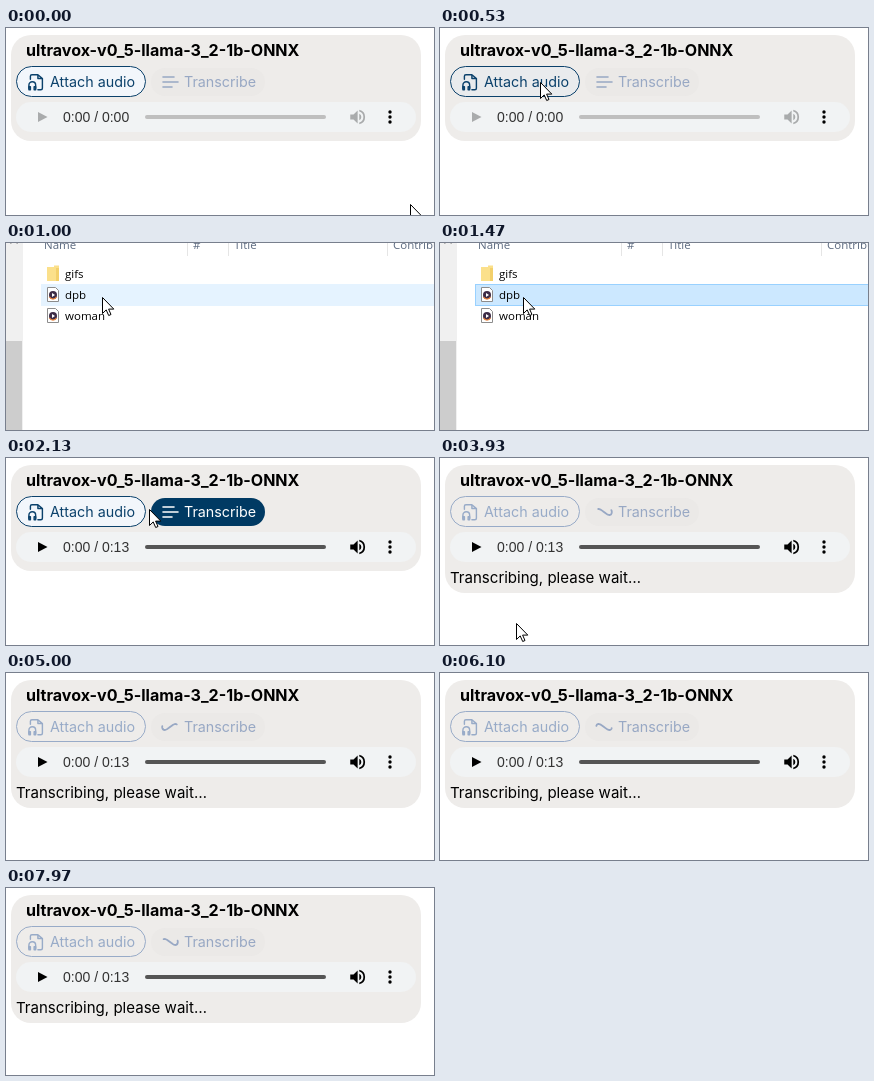
Recreate the animation shown at these times as an HTML page. Size 428 by 187 pixels, loop 8 s.

```html
<!DOCTYPE html>
<html lang="en">
<head>
<meta charset="utf-8">
<style>
  html, body { margin: 0; width: 100%; height: 100%; overflow: hidden; background: #fff; }
  svg { display: block; width: 428px; height: 187px; }
  .ui { font-family: Inter, sans-serif; font-size: 14.3px; }
  .files { font: 11.5px "Open Sans", sans-serif; }
  .line { fill: none; stroke: currentColor; stroke-linecap: round; stroke-linejoin: round; }
  .label { fill: currentColor; }
</style>
</head>
<body>
<svg viewBox="0 0 428 187">
  <g id="page" class="ui">
    <rect id="card" x="5" y="7" width="410" rx="20" fill="#eeecea"/>
    <text x="20" y="28" font-size="16.06" font-weight="700">ultravox-v0_5-llama-3_2-1b-ONNX</text>

    <g id="attach">
      <rect id="attachBox" x="10.5" y="38.5" width="129" height="30" rx="15" stroke="currentColor"/>
      <g class="line" stroke-width="1.9" transform="translate(21.4 45.2) scale(.75)">
        <path d="M4 8V4a2 2 0 0 1 2-2h8l6 5v13a2 2 0 0 1-2 2h-4M14 2v5h6M2 20v-4a4.500 4.500 0 0 1 9 0v4"/>
        <path d="M2 18h2v4H2zM9 18h2v4H9z"/>
      </g>
      <text class="label" x="44" y="59">Attach audio</text>
    </g>

    <g id="transcribe">
      <rect id="transcribeBox" x="145" y="40" width="114" height="28" rx="14"/>
      <path id="lines" class="line" stroke-width="1.6" d="M157 49h11M157 54h15M157 59h9"/>
      <path id="spinner" class="line" stroke-width="1.8"/>
      <text class="label" x="178" y="59">Transcribe</text>
    </g>

    <rect x="10" y="74" width="400" height="30" rx="15" fill="#f1f3f4"/>
    <g id="player">
      <path class="label" d="M32 84v10l9.500-5z"/>
      <g transform="translate(341.8 79.2) scale(.82)">
        <path class="label" d="M3 9v6h4l5 5V4L7 9zM16.5 12A4.5 4.5 0 0 0 14 8v8a4.5 4.5 0 0 0 2.5-4zM14 3.2v2.1a7 7 0 0 1 0 13.4v2.1a9 9 0 0 0 0-17.6z"/>
      </g>
    </g>
    <rect id="track" x="139" y="87" width="181" height="4" rx="2"/>
    <text id="clock" x="57" y="94" font-family="Liberation Sans, Arial, sans-serif" font-size="14" fill="#333"></text>
    <circle cx="384" cy="84" r="1.7"/><circle cx="384" cy="89" r="1.7"/><circle cx="384" cy="94" r="1.7"/>
    <text id="status" x="10" y="125" font-size="15.05">Transcribing, please wait…</text>
  </g>

  <g id="dialog" class="files">
    <rect width="428" height="187" fill="#fff"/>
    <rect width="17" height="187" fill="#f0f0f0"/>
    <rect y="98" width="16" height="89" fill="#cdcdcd"/>
    <path d="M5 0l3-2 3 2" class="line" stroke="#606060"/>
    <path d="M181.5 0v13M222.5 0v13M381.5 0v13" stroke="#e5e5e5"/>
    <g fill="#5c6a80">
      <text x="38" y="6">Name</text><text x="187" y="6">#</text>
      <text x="228" y="6">Title</text><text x="387" y="6">Contributing</text>
    </g>
    <rect id="row" x="35.5" y="41.5" width="400" height="21"/>
    <path d="M41 24h7v-1.500h5V38H41z" fill="#fbe08b"/><path d="M50 25h3v13h-3z" fill="#f3d06b"/>
    <g id="media">
      <path d="M41.500 44.500h8l3 3v11h-11z" fill="#fff" stroke="#8c8c8c"/>
      <circle cx="47" cy="52" r="4" fill="#3d2c46"/>
      <path d="M43.500 54a4 4 0 0 0 7 0" fill="none" stroke="#e8823a" stroke-width="1.300"/>
      <path d="M46 50v4l3-2z" fill="#fff"/>
    </g>
    <use href="#media" y="21"/>
    <text x="59" y="35">gifs</text><text x="59" y="56">dpb</text><text x="59" y="77">woman</text>
  </g>

  <path id="cursor" d="M.5.5v16l3.700-3.600 2.500 5.600 2.300-1-2.400-5.400h5.200z" fill="#fff" stroke="#000"/>
</svg>
<script>
const LOOP = 8000;
const el = Object.fromEntries([...document.querySelectorAll("[id]")].map(n => [n.id, n]));

// Cursor stops: time, x, y
const stops = [
  [0, 404, 176], [30, 404, 176], [530, 100, 54], [870, 100, 54], [1440, 83, 54],
  [1800, 83, 54], [2130, 143, 51], [2500, 200, 54], [2970, 200, 54],
  [3750, 76, 165], [3940, 76, 165], [4350, 60, 190], [LOOP, 60, 190]
];

function cursorAt(t) {
  const i = stops.findIndex(s => s[0] > t);
  const [t0, x0, y0] = stops[i - 1], [t1, x1, y1] = stops[i];
  let k = (t - t0) / (t1 - t0);
  if (t < 530 || (t > 2970 && t < 3750)) k = k * k * (3 - 2 * k);
  return [x0 + (x1 - x0) * k, y0 + (y1 - y0) * k];
}

// A stretch of a figure eight that travels once around every two seconds
function spinnerPath(t) {
  const head = 2.4 + (t - 3930) / 2000 * 2 * Math.PI, span = 2.75, steps = 30;
  let d = "";
  for (let i = 0; i <= steps; i++) {
    const u = head - span * i / steps;
    d += (i ? "L" : "M") + (164 + 7.8 * Math.cos(u)).toFixed(2) + " " + (54 + 3 * Math.sin(2 * u)).toFixed(2);
  }
  return d;
}

const show = (node, on) => node.setAttribute("display", on ? "inline" : "none");
const fill = (node, color) => node.setAttribute("fill", color);
const tint = (node, color) => { node.style.color = color; };

function draw(t) {
  const [x, y] = cursorAt(t);
  const dialog = t >= 960 && t < 1800, loaded = t >= 1800, busy = t >= 2970;
  const ready = loaded && !busy;
  const over = (left, right) => x >= left && x <= right && y >= 38 && y <= 69;

  show(el.dialog, dialog);
  show(el.page, !dialog);
  fill(el.row, t >= 1440 ? "#cce8ff" : "#e5f3ff");
  el.row.setAttribute("stroke", t >= 1440 ? "#99d1ff" : "#e5f3ff");

  el.card.setAttribute("height", busy ? 128 : 106);
  tint(el.attach, busy ? "#98abc8" : "#0b416b");
  fill(el.attachBox, busy ? "#eeecea" : over(10, 140) ? "#e9ebed" : "#f2f6fb");
  tint(el.transcribe, ready ? "#fff" : "#98a8c4");
  fill(el.transcribeBox, !ready ? "#ebe9e7" : t >= 2770 ? "#002b4c" : over(145, 259) ? "#06426d" : "#003a63");
  show(el.lines, !busy);
  show(el.spinner, busy);
  if (busy) el.spinner.setAttribute("d", spinnerPath(t));

  tint(el.player, loaded ? "#000" : "#a9abac");
  fill(el.track, loaded ? "#555" : "#bfbfbf");
  el.clock.textContent = loaded ? "0:00 / 0:13" : "0:00 / 0:00";
  show(el.status, busy);
  el.cursor.setAttribute("transform", `translate(${Math.round(x)} ${Math.round(y)})`);
}

function tick() {
  draw(performance.now() % LOOP);
  requestAnimationFrame(tick);
}
tick();
</script>
</body>
</html>
```
